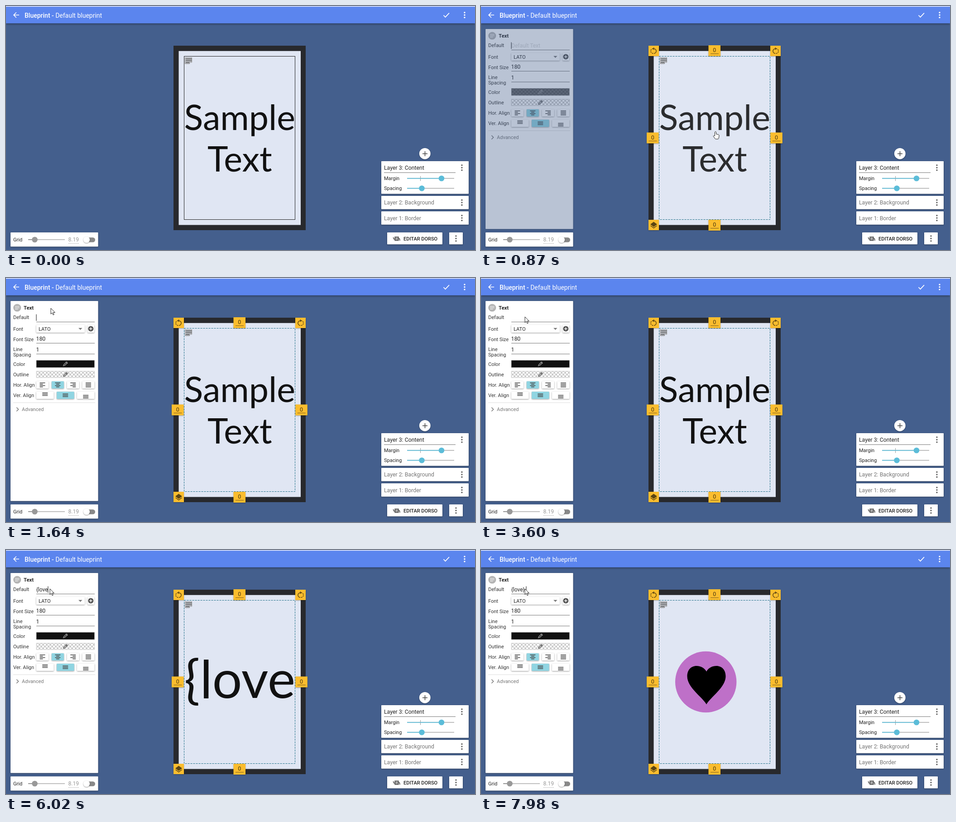
Recreate the animation shown at these times as an HTML page. Size 1036 by 541 pixels, loop 8000 ms.

```html
<!DOCTYPE html>
<html lang="en">
<head>
<meta charset="utf-8">
<title>Blueprint editor</title>
<style>
html, body { margin: 0; width: 100%; height: 100%; overflow: hidden; background: #445f8d; }
svg { display: block; width: 1036px; height: 541px; font: 11px Roboto, sans-serif; fill: #222; }
text { white-space: pre; }
.card { fill: #fff; filter: drop-shadow(0 1px 1.5px #0006); }
.line { fill: none; stroke: #777; }
.lato { font-family: Lato, sans-serif; text-anchor: middle; fill: #111; }
.handle { fill: #fbbd2e; filter: drop-shadow(0 1px 1px #0005); }
</style>
</head>
<body>
<svg id="stage" viewBox="0 0 1036 541">
  <defs>
    <pattern id="checker" width="8" height="8" patternUnits="userSpaceOnUse">
      <path d="M0 0h8v8h-8z" fill="#fff"/><path d="M0 0h4v8h4v-4h-8z" fill="#ccc"/>
    </pattern>
  </defs>
</svg>
<script>
const stage = document.getElementById('stage');
const text = (x, y, s, attrs = '') => `<text x="${x}" y="${y}" ${attrs}>${s}</text>`;
const path = (d, attrs = 'class="line"') => `<path d="${d}" ${attrs}/>`;
const circle = (x, y, r, fill, attrs = '') => `<circle cx="${x}" cy="${y}" r="${r}" fill="${fill}" ${attrs}/>`;
const rect = (x, y, w, h, attrs = 'class="card" rx="1"') =>
  `<rect x="${x}" y="${y}" width="${w}" height="${h}" ${attrs}/>`;
const dots = (x, y, fill = '#666') => [-5.5, 0, 5.5].map(d => circle(x, y + d, 1.7, fill)).join('');
const stroke = (color, width = 1) => `fill="none" stroke="${color}" stroke-width="${width}"`;

const header = () =>
  rect(0, 0, 1036, 38.5, 'fill="#5b85ee" style="filter:drop-shadow(0 1px 2px #0008)"') +
  rect(0, 0, 1036, 1.4, 'fill="#f4f6fc"') +
  path('M29 20H17.5M22.8 14.3L17 20l5.8 5.8', stroke('#fff', 1.6)) +
  text(41, 25.5, '<tspan font-weight="500">Blueprint - </tspan>Default blueprint', 'font-size="14" fill="#fff"') +
  path('M966.5 20.5l4 4.2 8.5-9', stroke('#fff', 1.7)) + dots(1013, 20, '#fff');

const cardBase = () =>
  rect(370, 88, 292, 409, 'fill="#28292d"') +
  rect(381.5, 99.8, 269.5, 385.7, 'fill="#e0e6f3"') +
  path('M395.5 114.5h15v10.5h-5v3h-10z', 'fill="#d0d3da" stroke="#888"') +
  path('M397 117.5h13M397 121.5h13M397 125.5h8', stroke('#333', 1.3));

function slider(x1, x2, y, knob, color) {
  return path(`M${x1} ${y}H${x2}`, stroke('#aaa', 1.5)) +
    path(`M${x1} ${y}H${knob}`, stroke(color, 1.8)) + circle(knob, y, 6.3, color);
}

const layers = () =>
  circle(925.3, 327.3, 12.4, '#fff', 'style="filter:drop-shadow(0 1px 1px #0005)"') +
  path('M920 327.5h11M925.5 322v11', stroke('#444', 1.5)) +
  rect(829, 344, 193, 72.5) + text(835, 363, 'Layer 3: Content', 'font-size="12.3"') +
  path('M835 369.5h158') + dots(1007, 358.5) +
  text(835, 386, 'Margin') + path('M915.5 377v11', stroke('#999')) + slider(886, 990, 382.3, 962, '#5bbcd8') +
  text(835, 408, 'Spacing') + slider(886, 990, 404.3, 918.5, '#5bbcd8') +
  ['Layer 2: Background', 'Layer 1: Border'].map((name, i) => {
    const y = 421 + 34.3 * i;
    return rect(829, y, 193, 29.5) + text(835, y + 19.3, name, 'font-size="12.3" fill="#757575"') + dots(1007, y + 14.7);
  }).join('');

const footer = () =>
  rect(10, 502, 193.5, 31.5) + text(16, 522, 'Grid') +
  path('M49 518H130', stroke('#aaa', 1.5)) + path('M49 518H63', stroke('#888', 1.5)) +
  circle(63.5, 518, 6.3, '#999') +
  text(137.5, 521.5, '8.19', 'font-size="12" fill="#999"') +
  path('M138 526.5h23', stroke('#999') + ' stroke-dasharray="1.5 1.5"') +
  rect(174, 513.2, 23, 10.5, 'rx="5.2" fill="#888"') +
  circle(178, 518.3, 7, '#fff', 'style="filter:drop-shadow(0 1px 1px #0006)"') +
  rect(842, 502, 122, 26.5) + text(878, 519.5, 'EDITAR DORSO', 'font-weight="500"') +
  path('M859 512h8v8h-8zM855.5 512.5q0 5 3.5 5M867 514.5q3.5 1 3 6', 'fill="#777" stroke="#666" stroke-width="1.5"') +
  path('M861 514.5h4M861 517h4', stroke('#fff')) +
  rect(979, 502, 30, 26.5) + dots(994, 515.5);

// Four text bars; `widths` set the alignment look.
const bars = (x, y, widths, align) => path(widths.map((w, i) =>
  `M${x + (align - .5) * (12 - w) - w / 2} ${y + i * 3}h${w}`).join(''), stroke('#444', 1.3));

function alignButtons() {
  let out = '';
  [0, .5, 1, .5].forEach((align, i) => {
    const x = 67 + 33.8 * i, on = i === 1;
    out += rect(x, 229, 27, 16, `class="card" rx="1" ${on ? 'style="fill:#90d5e2"' : ''}`) +
      bars(x + 13.5, 232.5, i === 3 ? [12, 12, 12, 12] : [12, 7, 12, 7], align);
  });
  [254.5, 257, 260].forEach((y, i) => {
    const x = 67 + 45 * i;
    out += rect(x, 252, 38.5, 16, `class="card" rx="1" ${i === 1 ? 'style="fill:#90d5e2"' : ''}`) +
      bars(x + 19.2, y, [12, 12, 12], .5);
  });
  return out;
}

const dropper = color => path('M126.8 194.7l1-2.8 5-5 2 2-5 5zM132.3 185.5l4 4M134 187.5l1.5-1.5', stroke(color, 1.6));

const panel = () =>
  rect(10, 51, 193.5, 443.5) +
  circle(24.7, 66, 8.6, '#b4b4b4') + path('M20 63h9.5M20 66h9.5M20 69h6.5', stroke('#fff', 1.2)) +
  text(39, 70, 'Text', 'font-weight="700" font-size="11.3"') +
  [['Default', 91], ['Font', 116.5], ['Font Size', 140], ['Line', 161.5], ['Spacing', 173.5], ['Color', 194.5],
   ['Outline', 218], ['Hor. Align', 241], ['Ver. Align', 264]].map(([s, y]) => text(16, y, s, 'fill="#333"')).join('') +
  path('M67 97.5h129M67 144.5h129M67 168.5h129') +
  text(67, 92, 'Default Text', 'id="placeholder" font-size="12" fill="#888"') +
  text(66.7, 92, '', 'id="input" font-size="12"') +
  rect(67, 104, 107, 17) + text(72, 117, 'LATO') + path('M160 110.7h8.5l-4.2 4.3z', 'fill="#777"') +
  rect(180, 104, 15, 17) + circle(187.3, 112.5, 6, '#555') + path('M184 112.5h6.6M187.3 109.2v6.6', stroke('#fff', 1.4)) +
  text(66.5, 139, '180', 'font-size="12.3"') + text(66.5, 163, '1', 'font-size="12.3"') +
  rect(67, 182.5, 128.5, 16, 'fill="url(#checker)"') + rect(67, 182.5, 128.5, 16, 'id="swatch" fill="#111" stroke="#bbb" stroke-width=".6"') +
  dropper('#888') +
  rect(67, 206.5, 128.5, 14.5, 'fill="url(#checker)" stroke="#bbb" stroke-width=".6"') +
  `<g transform="translate(0 23.5)">${dropper('#666')}</g>` +
  alignButtons() +
  path('M16 276.5h181', stroke('#ddd')) + path('M23.3 287l4.2 4.3-4.2 4.3', stroke('#777', 1.5)) +
  text(35, 295, 'Advanced', 'fill="#777"') +
  rect(66.5, 80.5, 1, 14.5, 'id="caret" fill="#111"');

const rotateIcon = (x, flip) => `<g transform="translate(${x} 99.7) scale(${flip} 1)">` +
  path('M.5 -5a5.3 5.3 0 0 1 0 10.6', stroke('#5b4513', 1.5)) +
  path('M-1 5.5a5.3 5.3 0 0 1 0-10.6', stroke('#5b4513', 1.5) + ' stroke-dasharray="3 1.5"') +
  path('M1 -8.2v6.2l-3.4-3.1z', 'fill="#5b4513"') + '</g>';

const handles = () =>
  [[370, 88], [639, 88], [370, 474]].map(([x, y]) => rect(x, y, 23, 23, 'class="handle"')).join('') +
  rotateIcon(381.3, 1) + rotateIcon(650.7, -1) +
  path('M381.5 478.5l7.5 5.6-7.5 5.6-7.5-5.6z', 'fill="#5b4513"') +
  path('M374.5 487l7 5.3 7-5.3', stroke('#5b4513', 1.5)) +
  [[502.5, 87], [366, 280.5], [639.3, 280.5], [502.5, 474]].map(([x, y]) =>
    rect(x, y, 26.5, 24, 'class="handle"') +
    text(x + 13.2, y + 15.3, '0', 'font-size="12.5" text-anchor="middle" fill="#4a3910"') +
    path(`M${x + 4.5} ${y + 18.8}h18`, stroke('#73591a'))).join('');

const heart = () =>
  circle(496.7, 292.5, 67.7, '#be70c8') +
  path('M498 342.3C490 327 455.5 305 455.5 280C455.5 266 464 257 476 257C486 257 494 262 498 269.5' +
    'C502 262 510 257 520 257C532 257 540.5 266 540.5 280C540.5 305 506 327 498 342.3z', 'fill="#000"');

stage.innerHTML += header() + cardBase() +
  text(516.3, 0, '', 'id="line0" class="lato"') + text(516.3, 0, '', 'id="line1" class="lato"') +
  `<g id="heart">${heart()}</g>` +
  rect(393.5, 111.5, 245, 362, 'id="frame" fill="none" stroke="#222"') +
  `<g id="handles">${handles()}</g>` + layers() + footer() + `<g id="panel">${panel()}</g>` +
  '<g id="cursor" fill="#fff" stroke="#222">' +
  path('M0 0v13l3-2.8 2.2 4.8 2-1-2.1-4.5h4.2z', 'id="arrow"') +
  path('M-1.5 10V1.5q1.5-2.5 3 0V6l5 1q1.8.6 1.5 3l-1 5.5q-.3 1.5-2 1.5H.5q-1 0-1.5-1l-4-5.5q.5-2 3.5-.5z', 'id="hand"') +
  '</g>';

const el = {};
for (const node of stage.querySelectorAll('[id]')) el[node.id] = node;
const show = (node, on) => node.setAttribute('visibility', on ? 'visible' : 'hidden');

const typing = [[0, ''], [3850, '{'], [5580, '{l'], [5900, '{lov'], [6020, '{love'], [6570, '{love}'], [7980, '{love} ']];
const caretFlips = [2300, 2630, 2960, 3290, 3600, 3850, 4150, 4480, 5030, 5360, 6890, 7120, 7430, 7760];
const cursorKeys = [[100, 560, 541], [540, 518, 278], [880, 518, 278], [1640, 99, 67], [1750, 99, 69],
  [1850, 98, 80], [2090, 98, 80], [2200, 98, 75], [2630, 97, 86]];

function cursorAt(t) {
  const next = cursorKeys.findIndex(k => k[0] > t);
  if (next < 0) return cursorKeys.at(-1).slice(1);
  const [a, b] = [cursorKeys[Math.max(0, next - 1)], cursorKeys[next]];
  const u = Math.max(0, (t - a[0]) / (b[0] - a[0])), e = u * u * (3 - 2 * u);
  return [a[1] + (b[1] - a[1]) * e, a[2] + (b[2] - a[2]) * e];
}

// Shrinks the text until its longest line fits the box.
let shown;
function layoutText(lines) {
  if (shown === lines.join()) return;
  shown = lines.join();
  const nodes = [el.line0, el.line1];
  nodes.forEach((node, i) => { node.textContent = lines[i] || ''; node.style.fontSize = '100px'; });
  const widest = Math.max(...nodes.map(node => node.getComputedTextLength()));
  const size = Math.min(147, 24550 / (widest || 1));
  const rise = lines.length > 1 ? .37 : .308;
  nodes.forEach((node, i) => {
    node.style.fontSize = size + 'px';
    node.setAttribute('y', 292.5 + size * (rise + 1.2 * (i - (lines.length - 1) / 2)));
  });
}

function draw(now) {
  const t = now % 8000;
  const step = t < 100 ? 0 : 100 + Math.floor((t - 100) / 110) * 110;
  const typed = typing.findLast(k => k[0] <= t)[1];
  const done = typed.includes('}');

  const fade = Math.min(1, Math.max(0, (step - 650) / 350));
  const selected = step >= 650;
  el.panel.setAttribute('opacity', fade);
  el.swatch.setAttribute('fill-opacity', fade);
  el.placeholder.setAttribute('opacity', fade < 1 ? .35 : 0);
  show(el.handles, selected);
  el.frame.setAttribute('stroke', selected ? '#1f6f88' : '#222');
  el.frame.setAttribute('stroke-dasharray', selected ? '4 2' : 'none');

  el.input.textContent = typed;
  el.caret.setAttribute('x', 66.5 + (typed ? el.input.getComputedTextLength() : 0));
  show(el.caret, caretFlips.filter(f => f <= t).length % 2 === 0);

  layoutText(done ? [] : typed ? [typed] : ['Sample', 'Text']);
  show(el.heart, done);
  el.heart.setAttribute('transform', `translate(${typed.endsWith(' ') ? 0 : 19.5} 0)`);

  const [x, y] = cursorAt(step);
  const hover = step > 0 && x > 393 && x < 639 && y > 111 && y < 473;
  show(el.cursor, step > 0);
  el.cursor.setAttribute('transform', `translate(${x} ${y})`);
  el.arrow.style.display = hover ? 'none' : '';
  el.hand.style.display = hover ? '' : 'none';
  for (const line of [el.line0, el.line1]) line.setAttribute('opacity', hover ? .87 : 1);
  requestAnimationFrame(draw);
}
draw(0);
</script>
</body>
</html>
```
